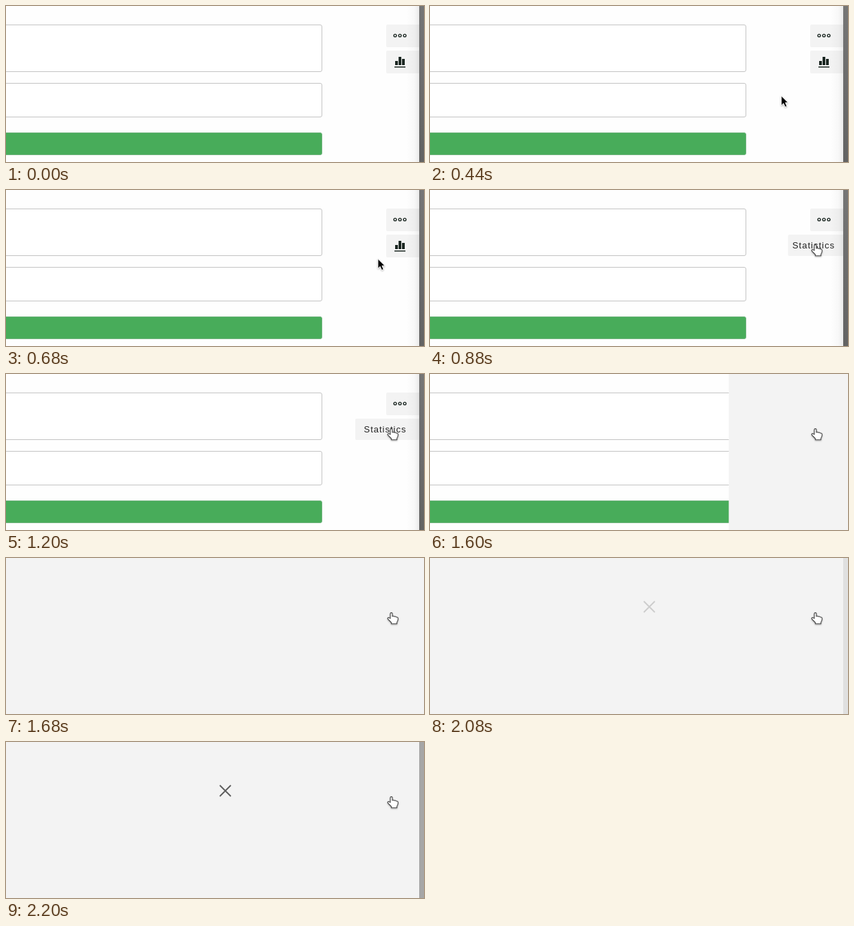
Write an HTML page that moves like this. It is 608 px wide and 227 px high and loops after 2.24 s.

```html
<!DOCTYPE html>
<html lang="en">
<head>
<meta charset="utf-8">
<title>Statistics panel</title>
<style>
  html, body { margin: 0; width: 100%; height: 100%; overflow: hidden; background: #fefefe; }
  svg { display: block; width: 608px; height: 227px; }
  text { font: 13px "Liberation Sans", Arial, sans-serif; letter-spacing: 1px; fill: #222; }
</style>
</head>
<body>
<svg viewBox="0 0 608 227">
  <defs>
    <linearGradient id="shade">
      <stop offset="0" stop-opacity="0"/>
      <stop offset=".65" stop-opacity=".025"/>
      <stop offset="1" stop-opacity=".08"/>
    </linearGradient>
    <linearGradient id="edge" x2="0" y2="1">
      <stop offset="0" stop-color="#767676"/>
      <stop offset="1" stop-color="#636363"/>
    </linearGradient>
    <filter id="drop" x="-50%" y="-50%" width="200%" height="200%">
      <feDropShadow dx="0" dy="1" stdDeviation="1" flood-opacity=".35"/>
    </filter>
  </defs>

  <rect width="608" height="227" fill="#fefefe"/>
  <g fill="#fff" stroke="#c4c4c4">
    <rect x="-10.5" y="27.5" width="470" height="68" rx="2.5"/>
    <rect x="-10.5" y="112.5" width="470" height="49" rx="2.5"/>
    <rect x="-10.5" y="184.5" width="470" height="32" rx="2.5" fill="#48ac5a" stroke="#74b581"/>
  </g>

  <g fill="#f3f3f3">
    <rect x="553" y="27" width="50" height="33" rx="2"/>
    <rect id="button" y="65" rx="2"/>
  </g>
  <g fill="none" stroke="#1c2823" stroke-width="1.4">
    <circle cx="566" cy="43" r="1.9"/>
    <circle cx="573" cy="43" r="1.9"/>
    <circle cx="580" cy="43" r="1.9"/>
  </g>
  <path id="chart" fill="#1c2823" d="M566 80h4v6h-4zM571 74h4v12h-4zM576 77h4v9h-4zM565 88h16v1.5h-16z"/>
  <text id="label" y="85">Statistics</text>
  <rect x="582" width="19" height="227" fill="url(#shade)"/>
  <rect x="601" width="7" height="227" fill="url(#edge)"/>

  <rect id="panel" width="608" height="227" fill="#f3f3f3"/>
  <g id="late">
    <path d="M311 63l16 16m0-16l-16 16" stroke="#5c5c5c" stroke-width="1.8"/>
    <rect x="601" width="7" height="227" fill="#a6a6a6"/>
  </g>

  <path id="arrow" filter="url(#drop)" fill="#000" stroke="#fff" stroke-width=".9"
    d="M0 0V14L3.2 11L5.6 16.3L8.2 15.2L5.9 10H10Z"/>
  <path id="hand" filter="url(#drop)" fill="#fff" stroke="#444" stroke-width="1.1" stroke-linejoin="round"
    d="M559 88V81.2Q559 79.6 560.5 79.6T562 81.2V85Q563.5 83.9 564.8 85.3Q566.3 84.4 567.5 86Q570.3 85.6 570.3 88.5Q570.3 91.5 568.6 93.5V95.8H560.5V94L555.3 88.6Q554.8 86.6 556.8 86.6Z"/>
</svg>
<script>
const LOOP = 2240, STEP = 40;
const $ = id => document.getElementById(id);
const set = (id, attrs) => {
  for (const name in attrs) $(id).setAttribute(name, attrs[name]);
};
const show = (id, on) => set(id, { visibility: on ? "visible" : "hidden" });
const progress = (t, from, to) => Math.min(1, Math.max(0, (t - from) / (to - from)));
const mix = (a, b, p) => a + (b - a) * p;

function draw(t) {
  const hover = t >= 840;
  const grow = 1 - (1 - progress(t, 840, 1040)) ** 3;
  const left = hover ? mix(533, 508, grow) : 553;
  set("button", { x: left, width: 603 - left, height: hover ? 31 : 33 });
  set("label", { x: mix(533, 520.5, grow) });
  show("label", hover);
  show("chart", !hover);

  const move = progress(t, 280, 840);
  set("arrow", { transform: `translate(${mix(491, 561, move)} ${mix(151, 80, move)})` });
  show("arrow", t >= 280 && !hover);
  show("hand", hover);

  set("panel", { x: 608 * (1 - progress(t, 1360, 1680) ** 4.36) });
  set("late", { opacity: progress(t, 2040, 2200) });
}

function tick() {
  const t = performance.now() % LOOP;
  draw(Math.floor(t / STEP) * STEP);
  requestAnimationFrame(tick);
}
tick();
</script>
</body>
</html>
```
